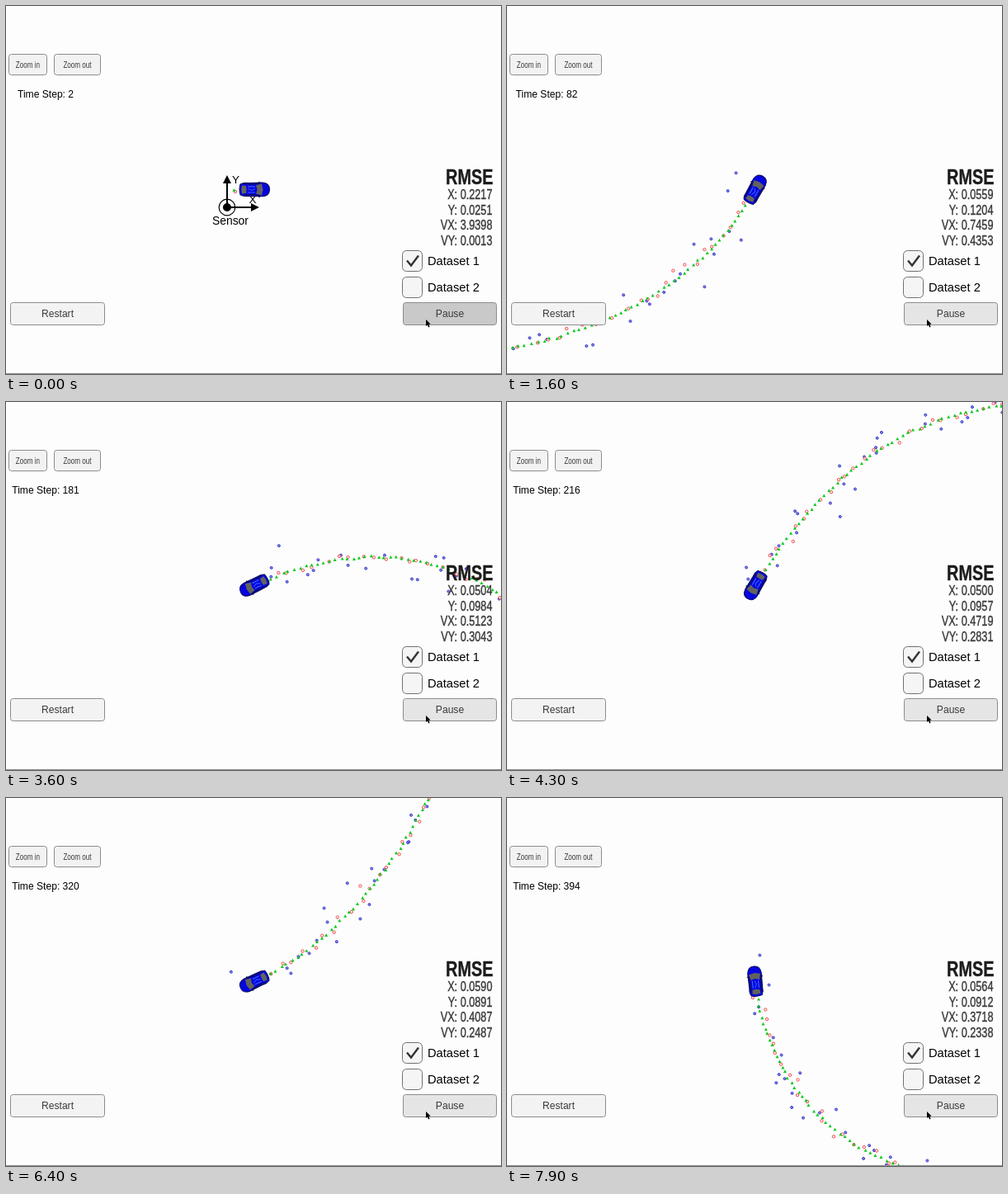
Animation, 600 px wide and 446 px high, one loop 8000 ms. Source, as an HTML page with a canvas:

```html
<!DOCTYPE html>
<html lang="en">
<head>
<meta charset="utf-8">
<title>Tracking simulator</title>
<style>
  html, body { margin: 0; width: 100%; height: 100%; overflow: hidden; background: #fdfdfd; }
  canvas { display: block; width: 600px; height: 446px; }
</style>
</head>
<body>
<canvas id="stage" width="600" height="446"></canvas>
<script>
const ctx = document.getElementById('stage').getContext('2d');
const FONT = '"Liberation Sans", Arial, sans-serif';
const LOOP = 8000, TICK = 100, LAST = 400;
const CAR = { x: 301, y: 222 };
const SENSOR = { x: -33, y: 22 };

// RMSE readings at a few time steps: step, x, y, vx, vy
const READINGS = [
  [2, .2217, .0251, 3.9398, .0013],
  [82, .0559, .1204, .7459, .4353],
  [147, .0509, .1017, .5643, .3312],
  [216, .0500, .0957, .4719, .2831],
  [275, .0562, .0879, .4343, .2546],
  [320, .0590, .0891, .4087, .2487],
  [394, .0564, .0912, .3718, .2338]
];

// The simulator slows down a little as the trail grows
const stepAt = t => Math.floor(2 + t * (.05023 - 7.5e-8 * t));

// Errors follow a power of the sample count between readings
function rmseAt(step) {
  let i = 0;
  while (i < READINGS.length - 2 && step >= READINGS[i + 1][0]) i++;
  const [from, ...a] = READINGS[i], [to, ...b] = READINGS[i + 1];
  const f = Math.log(step / from) / Math.log(to / from);
  return a.map((v, j) => v * Math.pow(b[j] / v, f));
}

// Figure-eight drive: sinusoidal yaw rate, slightly varying speed
const OMEGA = Math.PI * 2 / 500;
const heading = k => 2.1905 * (1 - Math.cos(OMEGA * k));
const speed = k => 7.82 * (.9615 + .0385 * Math.cos(2 * OMEGA * k));
const path = [{ x: -15.6, y: 0 }];
for (let k = 0; k < LAST; k++) {
  const h = heading(k + .5), v = speed(k + .5), p = path[k];
  path.push({ x: p.x + v * Math.cos(h), y: p.y - v * Math.sin(h) });
}

const rand = n => {
  const s = Math.sin(n * 12.9898) * 43758.5453;
  return s - Math.floor(s);
};
const gauss = n => (rand(n) + rand(n + .31) + rand(n + .67) - 1.5) * 2;

// Lidar and radar take turns; radar noise is polar around the sensor
const estimates = [], lidar = [], radar = [];
for (let k = 1; k < LAST; k++) {
  const { x, y } = path[k];
  const settle = -16 * Math.exp((1 - k) / 2);
  estimates.push({ k, x: x + settle + gauss(k + 900) * .7, y: y + 1 + gauss(k + 1300) * .7 });
  if (k % 2) {
    lidar.push({ k, x: x + settle + gauss(k) * 3.6, y: y + gauss(k + 500) * 3.6 });
  } else {
    const dx = x - SENSOR.x, dy = y - SENSOR.y;
    const angle = Math.atan2(dy, dx) + gauss(k + 500) * .03;
    const range = Math.hypot(dx, dy) + gauss(k) * 8;
    radar.push({ k, x: SENSOR.x + range * Math.cos(angle), y: SENSOR.y + range * Math.sin(angle) });
  }
}

function text(str, x, y, size, { align = 'left', color = '#000', weight = 'normal', squeeze = 1, bolder = 0 } = {}) {
  ctx.save();
  ctx.translate(x, y);
  ctx.scale(squeeze, 1);
  ctx.font = `${weight} ${size}px ${FONT}`;
  ctx.textAlign = align;
  ctx.fillStyle = ctx.strokeStyle = color;
  ctx.fillText(str, 0, 0);
  if (bolder) {
    ctx.lineWidth = bolder;
    ctx.strokeText(str, 0, 0);
  }
  ctx.restore();
}

function box(x, y, w, h, r, fill, stroke = '#8c8c8c') {
  ctx.beginPath();
  ctx.roundRect(x + .5, y + .5, w - 1, h - 1, r);
  ctx.fillStyle = fill;
  ctx.fill();
  ctx.strokeStyle = stroke;
  ctx.lineWidth = 1;
  ctx.stroke();
}

function poly(points, fill) {
  ctx.beginPath();
  points.forEach(([x, y]) => ctx.lineTo(x, y));
  ctx.closePath();
  ctx.fillStyle = fill;
  ctx.fill();
}

function line(points, color, width) {
  ctx.beginPath();
  points.forEach(([x, y]) => ctx.lineTo(x, y));
  ctx.strokeStyle = color;
  ctx.lineWidth = width;
  ctx.stroke();
}

function disc(x, y, r, fill, stroke, width = 1) {
  ctx.beginPath();
  ctx.arc(x, y, r, 0, Math.PI * 2);
  if (fill) { ctx.fillStyle = fill; ctx.fill(); }
  if (stroke) { ctx.strokeStyle = stroke; ctx.lineWidth = width; ctx.stroke(); }
}

function drawArrow(angle) {
  ctx.save();
  ctx.rotate(angle);
  line([[0, 0], [32, 0]], '#000', 2);
  poly([[29, -5], [39, 0], [29, 5]], '#000');
  ctx.restore();
}

function drawSensor() {
  ctx.save();
  ctx.translate(SENSOR.x, SENSOR.y);
  disc(0, 0, 9.8, '#fdfdfd', '#000', 1.2);
  drawArrow(0);
  drawArrow(-Math.PI / 2);
  disc(0, 0, 5, '#000');
  const label = { align: 'center' };
  text('Y', 10.5, -29, 13.5, label);
  text('X', 31, -5, 13.5, label);
  text('Sensor', 4, 21, 13.9, label);
  ctx.restore();
}

function drawTrail(step) {
  const upTo = list => list.filter(m => m.k <= step);
  for (const { x, y } of upTo(radar)) {
    disc(x, y, 1.5, '#c4c4f4', '#2020c8', .9);
    line([[x - 1, y - 1], [x + 1, y + 1]], '#2020c8', .7);
  }
  for (const { x, y } of upTo(lidar)) disc(x, y, 1.7, '#fff2f2', '#f03c3c', .9);
  for (const { x, y } of upTo(estimates))
    poly([[x - 2, y + 1.7], [x, y - 2], [x + 2, y + 1.7]], '#0cc81c');
}

function drawCar(angle) {
  ctx.save();
  ctx.translate(CAR.x, CAR.y + .4);
  ctx.rotate(-angle);
  for (const s of [-1, 1]) poly([[4, s * 7], [6, s * 10], [8, s * 7]], '#0a0a60');
  ctx.beginPath();
  ctx.moveTo(-17, -6.5);
  ctx.quadraticCurveTo(-13, -8.8, -8, -8);
  ctx.lineTo(10, -8.3);
  ctx.quadraticCurveTo(18.5, -7.5, 18.5, 0);
  ctx.quadraticCurveTo(18.5, 7.5, 10, 8.3);
  ctx.lineTo(-8, 8);
  ctx.quadraticCurveTo(-13, 8.8, -17, 6.5);
  ctx.quadraticCurveTo(-19, 0, -17, -6.5);
  ctx.fillStyle = '#0505df';
  ctx.fill();
  ctx.strokeStyle = '#08085a';
  ctx.lineWidth = 1;
  ctx.stroke();
  poly([[2, -5.2], [9, -7], [10.5, 0], [9, 7], [2, 5.2], [3.5, 0]], '#62625e');
  poly([[-15, -5], [-10, -4.5], [-9.5, 0], [-10, 4.5], [-15, 5], [-15.8, 0]], '#62625e');
  for (const s of [-1, 1]) {
    line([[-13, s * 6.8], [-3, s * 6.2], [7, s * 7.5]], '#101040', 1);
    line([[-8, s * 3.6], [1, s * 3.6]], '#3b62ff', 1.2);
  }
  line([[-8, -1], [-3, 1], [1, -1]], '#3b62ff', 1);
  ctx.restore();
}

function drawCheckbox(y, label, checked) {
  box(480, y, 25, 26, 5, '#f5f5f5', '#707070');
  if (checked) line([[486, y + 12.5], [491, y + 18.5], [500, y + 6.5]], '#333', 2.4);
  text(label, 511, y + 17.5, 14.7);
}

function drawButton(x, y, w, h, label, size, fill, squeeze = 1) {
  box(x, y, w, h, 3, fill);
  text(label, x + w / 2, y + h / 2 + 4, size, { align: 'center', color: '#3a3a3a', squeeze });
}

function drawPanel(step, pressed) {
  drawButton(3, 58, 47, 26, 'Zoom in', 10.8, '#f2f2f2', .75);
  drawButton(58, 58, 57, 26, 'Zoom out', 10.8, '#f2f2f2', .75);
  drawButton(5, 359, 115, 28, 'Restart', 12.1, '#f3f3f3');
  drawButton(481, 359, 114, 28, 'Pause', 12.1, pressed ? '#c9c9c9' : '#e5e5e5');
  text('Time Step: ' + step, 48, 111, 12.1, { align: 'center' });

  const column = { align: 'right', color: '#383838', squeeze: .78, bolder: .4 };
  text('RMSE', 590.5, 216, 25.5, { ...column, weight: 'bold', color: '#1c1c1c' });
  const rmse = rmseAt(step);
  ['X', 'Y', 'VX', 'VY'].forEach((name, i) =>
    text(`${name}: ${rmse[i].toFixed(4)}`, 589.5, 234 + i * 18.6, 16.3, column));

  drawCheckbox(296, 'Dataset 1', true);
  drawCheckbox(328, 'Dataset 2', false);
  poly([[509, 380], [509, 388], [510.8, 386.4], [512.2, 389.4], [513.6, 388.7],
    [512.2, 385.8], [514.6, 385.6]], '#000');
}

function draw(t) {
  const step = stepAt(t), here = path[step];
  ctx.fillStyle = '#fdfdfd';
  ctx.fillRect(0, 0, 600, 446);
  ctx.save();
  ctx.translate(CAR.x - here.x, CAR.y - here.y);
  drawSensor();
  drawTrail(step);
  ctx.restore();
  drawCar(heading(step));
  drawPanel(step, t < TICK);
  ctx.fillStyle = '#8c8c8c';
  ctx.fillRect(0, 445, 600, 1);
}

const start = performance.now();
function frame() {
  const t = (performance.now() - start) % LOOP;
  draw(Math.floor(t / TICK) * TICK);
  requestAnimationFrame(frame);
}
frame();
</script>
</body>
</html>
```
